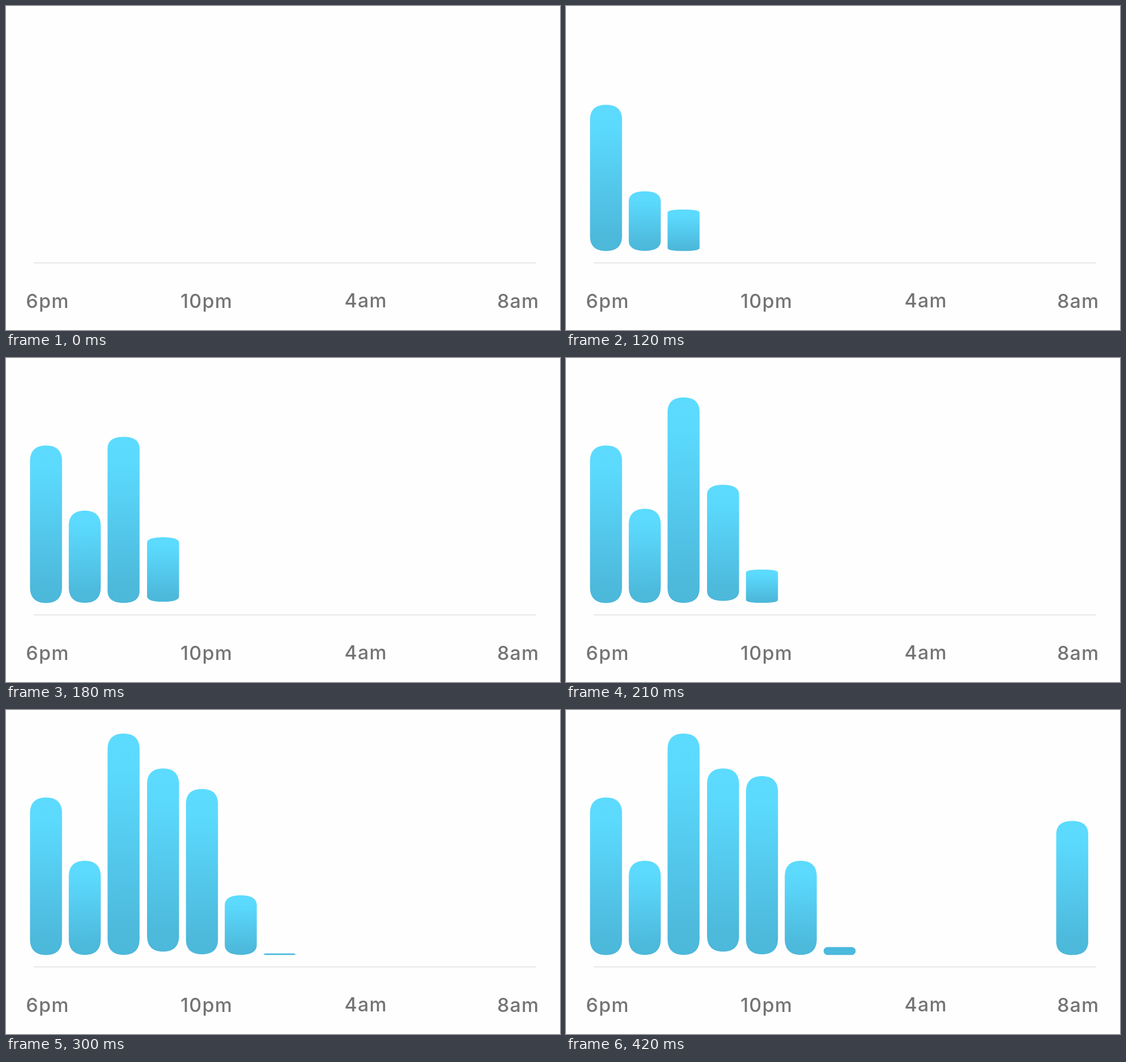
These frames come from a looping animation (978x573 px, 8 s). An HTML page with a canvas:

```html
<!DOCTYPE html>
<html lang="en">
<head>
<meta charset="utf-8">
<title>Evening bar chart</title>
<style>
html, body { margin: 0; width: 100%; height: 100%; overflow: hidden; background: #fefefe; }
canvas { display: block; }
</style>
</head>
<body>
<canvas id="stage" width="978" height="573"></canvas>
<script>
const ctx = document.getElementById('stage').getContext('2d');

const LOOP = 8000, STEP = 30, END = 420;
const DELAY = 15, STAGGER = 45, GROW = 135;
const BASE = 433.2, BAR_W = 56.5;

// left edge, full height, gap between base and bar
const bars = [
  [42.4, 278.4, 0], [110.8, 166.2, 0.2], [179.3, 391.3, 0.2], [249, 323.8, 6],
  [317.7, 315, 1.2], [386.2, 166.2, 0.2], [454.8, 14, 0], [865.4, 279, 0]
];

// text, left edge, baseline
const labels = [
  ['6pm', 35.3, 534], ['10pm', 308, 534], ['4am', 597.6, 533.4], ['8am', 867, 534]
];

function ease(x) {
  return x + x * (1 - x) * (0.79 - 0.27 * x + 0.48 * x * x);
}

// rectangle with soft corners; k sets how far the curves bulge
function softRect(x, y, w, h, r, k) {
  const c = r * (1 - k), x2 = x + w, y2 = y + h;
  ctx.beginPath();
  ctx.moveTo(x + r, y);
  ctx.lineTo(x2 - r, y);
  ctx.bezierCurveTo(x2 - c, y, x2, y + c, x2, y + r);
  ctx.lineTo(x2, y2 - r);
  ctx.bezierCurveTo(x2, y2 - c, x2 - c, y2, x2 - r, y2);
  ctx.lineTo(x + r, y2);
  ctx.bezierCurveTo(x + c, y2, x, y2 - c, x, y2 - r);
  ctx.lineTo(x, y + r);
  ctx.bezierCurveTo(x, y + c, x + c, y, x + r, y);
}

function barFill(h) {
  if (h < 20) return '#4bbadd';
  const g = ctx.createLinearGradient(0, -h, 0, 0);
  g.addColorStop(0, '#5cdbff');
  g.addColorStop(0.15, '#5bdafe');
  g.addColorStop(0.9, '#4db9db');
  g.addColorStop(1, '#4cb8da');
  return g;
}

function drawBar([x, h, gap], age) {
  if (age < 0) return;
  const grown = ease(Math.min(age / GROW, 1));
  const pill = h < 20;
  ctx.save();
  ctx.translate(x, BASE);
  ctx.scale(1, Math.max(grown, 2 / h));
  ctx.translate(0, -gap);
  softRect(0, -h, BAR_W, h, pill ? h / 2 : 28, pill ? 0.55 : 0.66);
  ctx.fillStyle = barFill(h);
  ctx.fill();
  ctx.restore();
}

function drawAxis() {
  ctx.strokeStyle = '#ebebeb';
  ctx.lineWidth = 2.6;
  ctx.lineCap = 'round';
  ctx.beginPath();
  ctx.moveTo(50.3, 454.2);
  ctx.lineTo(934.7, 454.2);
  ctx.stroke();

  ctx.fillStyle = '#747474';
  ctx.font = '500 34px Inter, sans-serif';
  ctx.letterSpacing = '1.2px';
  for (const [text, x, y] of labels) ctx.fillText(text, x, y);
}

function draw(t) {
  ctx.fillStyle = '#fefefe';
  ctx.fillRect(0, 0, 978, 573);
  drawAxis();
  bars.forEach((bar, i) => drawBar(bar, t - DELAY - i * STAGGER));
}

const start = performance.now();
function tick() {
  const t = (performance.now() - start) % LOOP;
  draw(Math.min(Math.floor(t / STEP) * STEP, END));
  requestAnimationFrame(tick);
}
tick();
</script>
</body>
</html>
```
